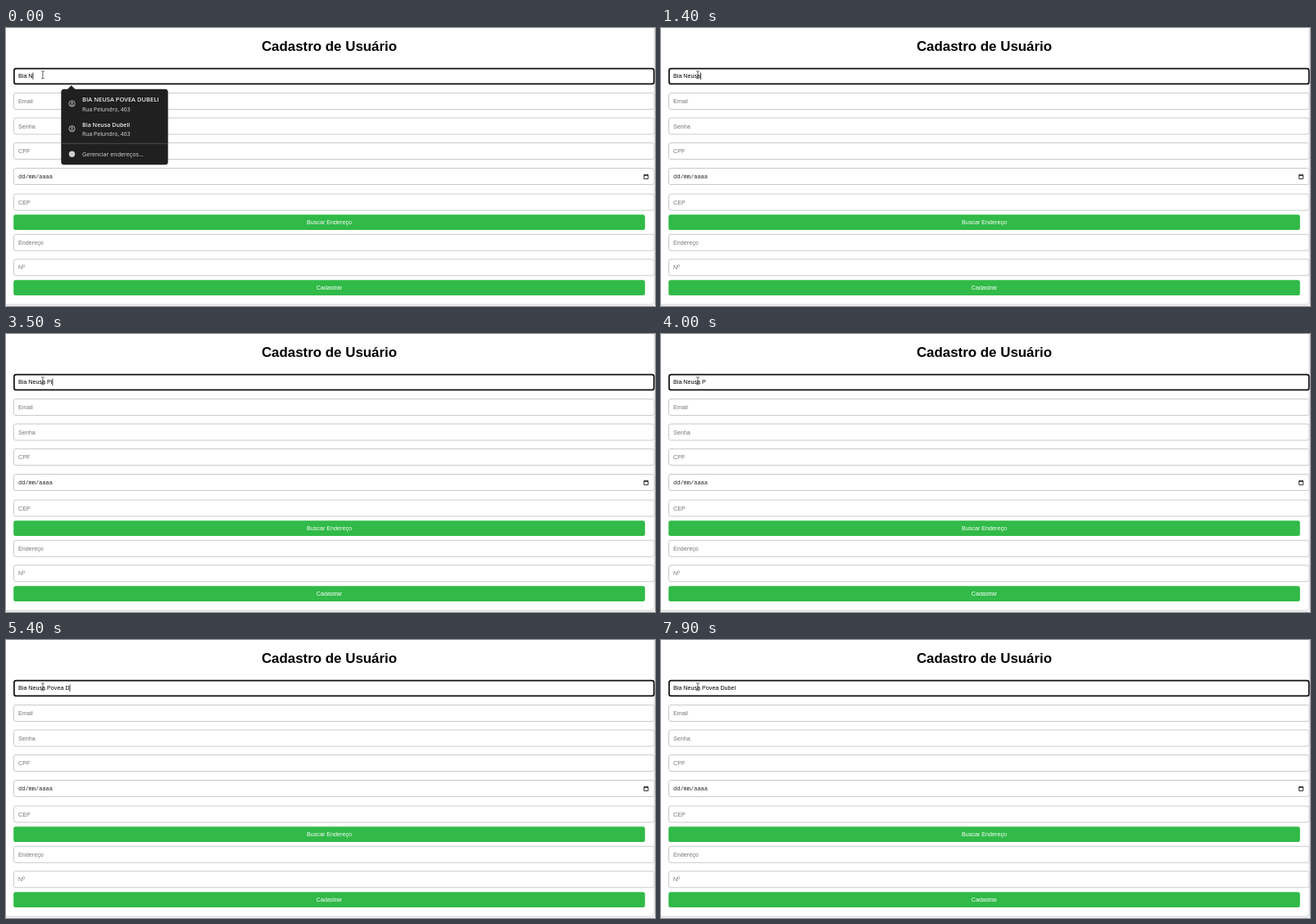
An HTML page for the animation above (8000 ms loop, 792 by 340 pixels).

```html
<!DOCTYPE html>
<html lang="pt-BR">
<head>
<meta charset="utf-8">
<title>Cadastro de Usuário</title>
<style>
  html, body { margin: 0; width: 100%; height: 100%; overflow: hidden; background: #fff; }
  svg { display: block; }
  text { font: 7.18px "Liberation Sans", Arial, sans-serif; white-space: pre; }
  .title { font-size: 16.9px; font-weight: 700; text-anchor: middle; }
  .hint { fill: #757575; }
  .date { font: 7px "Liberation Mono", monospace; fill: #222; }
  .label { fill: #fff; text-anchor: middle; }
  .menu text { font: 6.9px "Open Sans", "Noto Sans", sans-serif; fill: #dcdcdc; }
  .menu .name { font-weight: 600; fill: #ececec; }
</style>
</head>
<body>
<svg id="stage" width="792" height="340" viewBox="0 0 792 340"></svg>
<script>
const LOOP = 8000;
const FIRST = "Bia Neusa";
const ADDRESS = "Rua Pelundro, 463";
const stage = document.getElementById("stage");

function add(parent, tag, attrs, content) {
  const el = document.createElementNS("http://www.w3.org/2000/svg", tag);
  for (const key in attrs) el.setAttribute(key, attrs[key]);
  if (content) el.textContent = content;
  parent.appendChild(el);
  return el;
}

function label(parent, x, y, content, cls) {
  return add(parent, "text", { x, y, class: cls || "" }, content);
}

function box(parent, x, y, width, height, rx, attrs) {
  return add(parent, "rect", { x, y, width, height, rx, ...attrs });
}

function field(y, hint, cls = "hint") {
  box(stage, 9.5, y, 781.5, 20, 2.5, { fill: "#fff", stroke: "#cacaca" });
  label(stage, 15, y + 12.5, hint, cls);
}

function button(y, content) {
  box(stage, 9.2, y, 770.6, 18.8, 2.5, { fill: "#31ba48" });
  label(stage, 394.5, y + 12, content, "label");
}

// Page and form
box(stage, -9, -9, 800.5, 347.5, 4, { fill: "#fff", stroke: "#f0f0f0", "stroke-width": 3 });
box(stage, -9, -9, 800.3, 347.3, 4, { fill: "none", stroke: "#dedede" });
label(stage, 394.5, 28, "Cadastro de Usuário", "title");
box(stage, 9.9, 49.6, 780.8, 18.8, 2.5, { fill: "#fff", stroke: "#101010", "stroke-width": 1.7 });
field(79.5, "Email");
field(110, "Senha");
field(140.5, "CPF");
field(171.5, "dd/mm/aaaa", "date");
field(203, "CEP");
field(252.3, "Endereço");
field(282.8, "Nº");
button(228.3, "Buscar Endereço");
button(308.2, "Cadastrar");
add(stage, "path", { d: "M778.6 179.6h5v4.9h-5zM778.6 180.4h5M779.6 178.6v1M782.6 178.6v1", fill: "none", stroke: "#222", "stroke-width": 0.9 });

const typed = label(stage, 15, 61.4, "");
const caret = box(stage, 0, 54.5, 0.8, 8.5, 0, { fill: "#111" });

// Autofill menu
function person(parent, y) {
  const line = { fill: "none", stroke: "#d5d5d5", "stroke-width": 0.8 };
  add(parent, "circle", { cx: 80.5, cy: y, r: 3.6, ...line });
  add(parent, "circle", { cx: 80.5, cy: y - 0.9, r: 1.1, ...line });
  add(parent, "path", { d: `M78.1 ${y + 2.4}q2.4 -2 4.8 0`, ...line });
}

function menu(names) {
  const g = add(stage, "g", { class: "menu" });
  const end = 79.5 + names.length * 30.7;
  add(g, "path", { d: "M74.5 75.5L79.7 70.2L85 75.5z", fill: "#202020" });
  box(g, 67.3, 74.8, 130.4, end - 74.8 + 26.4, 3.5, { fill: "#202020" });
  names.forEach((name, i) => {
    const y = 92.5 + i * 30.7;
    person(g, y);
    const title = label(g, 93, y - 2.7, name, "name");
    title.style.fontSize = i ? "7.1px" : "7.5px";
    label(g, 93, y + 9.2, ADDRESS);
  });
  box(g, 67.3, end, 130.4, 0.7, 0, { fill: "#5c5c5c" });
  add(g, "circle", { cx: 80.5, cy: end + 13.3, r: 3.7, fill: "#cfcfcf" });
  label(g, 93, end + 16.2, "Gerenciar endereços...").style.fontSize = "7.15px";
  return g;
}

const fullName = "BIA NEUSA POVEA DUBELI";
const menus = [null, menu([fullName]), menu([fullName, "Bia Neusa Dubeli"])];

// Mouse pointer
add(stage, "path", { d: "M43 52.8h1.4l.5 .5l.5 -.5h1.4M44.9 53.3v8M43 61.8h1.4l.5 -.5l.5 .5h1.4", fill: "none", stroke: "#333", "stroke-width": 0.8 });

// [start, text, menu entries, caret]
const steps = [
  [0, "Bia N", 2, 1],
  [100, "Bia N", 0, 1],
  [300, "Bia Ne", 0, 1],
  [400, "Bia Neu", 0, 1],
  [600, "Bia Neus", 0, 1],
  [700, FIRST, 0, 1],
  [900, FIRST, 2, 1],
  [1400, FIRST, 0, 1],
  [1700, FIRST + " P", 0, 1],
  [1800, FIRST + " P", 1, 1],
  [1900, FIRST + " Pi", 0, 1],
  [2100, FIRST + " Pive", 0, 1],
  [2300, FIRST + " Pivea", 0, 1],
  [3300, FIRST + " Pive", 0, 1],
  [3400, FIRST + " Piv", 0, 1],
  [3500, FIRST + " Pi", 0, 1],
  [3600, FIRST + " P", 0, 1],
  [3800, FIRST + " ", 0, 1],
  [3900, FIRST + " P", 1, 1],
  [4000, FIRST + " P", 0, 0],
  [4300, FIRST + " Po", 0, 1],
  [4500, FIRST + " Pov", 0, 1],
  [4600, FIRST + " Pove", 0, 1],
  [4700, FIRST + " Pove", 1, 1],
  [4800, FIRST + " Povea", 0, 1],
  [5000, FIRST + " Povea ", 0, 1],
  [5300, FIRST + " Povea D", 1, 1],
  [5400, FIRST + " Povea D", 0, 1],
  [5700, FIRST + " Povea Dub", 0, 1],
  [5800, FIRST + " Povea Dube", 0, 1],
  [6100, FIRST + " Povea Dubel", 0, 1],
  [6300, FIRST + " Povea Dubelu", 0, 1],
  [6400, FIRST + " Povea Dubelu", 0, 0],
  [7000, FIRST + " Povea Dubelu", 0, 1],
  [7300, FIRST + " Povea Dubel", 0, 1],
  [7500, FIRST + " Povea Dubel", 1, 1],
  [7600, FIRST + " Povea Dubel", 1, 0],
  [7900, FIRST + " Povea Dubel", 0, 0]
];

let shown = null;

function render(time) {
  const step = steps.findLast(s => s[0] <= time);
  if (step === shown) return;
  shown = step;
  const [, content, entries, blink] = step;
  typed.textContent = content;
  caret.setAttribute("x", 15 + typed.getComputedTextLength());
  caret.style.display = blink ? "" : "none";
  menus.forEach((m, i) => { if (m) m.style.display = i === entries ? "" : "none"; });
}

const start = performance.now();
function tick() {
  render((performance.now() - start) % LOOP);
  requestAnimationFrame(tick);
}
tick();
</script>
</body>
</html>
```
